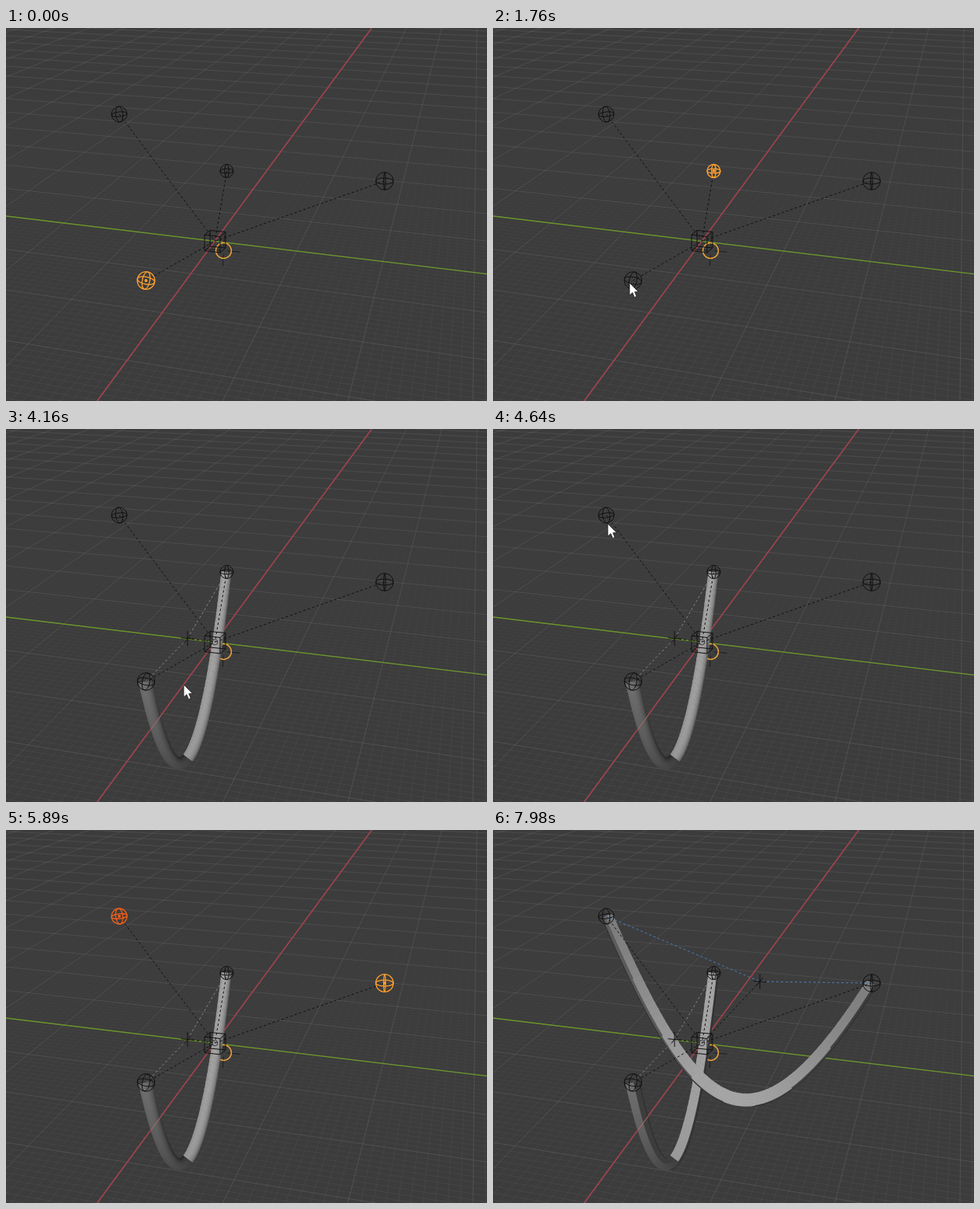
Animation of 620x480 px, one loop 8 s. Source, as an HTML page with a canvas:

```html
<!DOCTYPE html>
<html lang="en">
<head>
<meta charset="utf-8">
<title>Hanging tubes</title>
<style>
html, body { margin: 0; width: 100%; height: 100%; overflow: hidden; background: #3c3c3c; }
canvas { display: block; width: 620px; height: 480px; }
</style>
</head>
<body>
<canvas id="stage" width="620" height="480"></canvas>
<script>
const W = 620, H = 480, LOOP = 8000, STEP = 77.7;
const BLACK = '#101010', ACTIVE = '#ffa02e', PICKED = '#f0601a';
const ctx = document.getElementById('stage').getContext('2d');

const lerp = (a, b, k) => a + (b - a) * k;
const ease = k => k * k * (3 - 2 * k);
const arch = t => Math.sin(Math.PI * t);
const gray = v => `rgb(${[v, v, v].map(Math.round)})`;

function line(c, a, b, color, width = 1, dash = []) {
  c.strokeStyle = color;
  c.lineWidth = width;
  c.setLineDash(dash);
  c.beginPath();
  c.moveTo(...a);
  c.lineTo(...b);
  c.stroke();
  c.setLineDash([]);
}

function ring([x, y], rx, ry, tilt, color, width = 1) {
  ctx.strokeStyle = color;
  ctx.lineWidth = width;
  ctx.beginPath();
  ctx.ellipse(x, y, rx, ry, tilt, 0, 7);
  ctx.stroke();
}

// Ground plane: u runs along the red axis, v along the green one
const ORIGIN = [269.4, 274.2], FAR_U = [609, -188], FAR_V = [-3601, -188];
function ground(u, v) {
  const a = u * 0.0831, b = v * 0.0265, w = 1 + a + b;
  return [0, 1].map(i => (ORIGIN[i] + a * FAR_U[i] + b * FAR_V[i]) / w);
}

function makeFloor() {
  const cv = document.createElement('canvas');
  cv.width = W;
  cv.height = H;
  const c = cv.getContext('2d');
  c.fillStyle = '#3c3c3c';
  c.fillRect(0, 0, W, H);
  const fade = (top, from, to) => {
    const g = c.createLinearGradient(0, top, 0, H);
    g.addColorStop(0, `rgba(255,255,255,${from})`);
    g.addColorStop(1, `rgba(255,255,255,${to})`);
    return g;
  };
  const grid = (n, color) => {
    for (let i = -5 * n; i <= 20 * n; i++) {
      if (n > 1 && i % n === 0) continue;
      line(c, ground(i / n, -6), ground(i / n, 14), color);
      if (i <= 12 * n) line(c, ground(-6, i / n), ground(30, i / n), color);
    }
  };
  grid(10, fade(60, 0, 0.045));
  grid(1, fade(0, 0.08, 0.1));
  line(c, [0, 242], [620, 316.6], '#6a9629', 1.4);
  line(c, [471.5, 0], [117.4, 480], '#a2424d', 1.6);
  return cv;
}
const floor = makeFloor();

// Tubes: points of a cubic, then half width and tones by place t along and s across
const tubeA = {
  pts: [[180, 325], [205, 445], [245, 532], [284, 184]],
  half: t => 9 - 2.8 * t,
  tone: t => t < 0.56 ? 112 - 85 * t : 138 + 28 * t,
  peak: t => t < 0.56 ? -0.4 : 0.35,
  flat: (t, s, tone) => t < 0.56 ? (s < 0.1 ? tone : 62) : (s > -0.6 ? tone : 62),
  edge: t => t < 0.5 ? 1 : -1
};
const tubeB = {
  pts: [[147, 110], [257, 363], [331, 448], [488, 197]],
  half: t => 7.2 + 1.3 * arch(t),
  tone: t => 124 + 42 * arch(t),
  peak: () => 0.25,
  flat: (t, s, tone) => s > 1.3 * Math.abs(t - 0.55) - 1 ? tone : lerp(95, 62, t),
  edge: () => -1
};

// Point at offset s (-1 outer side, 1 inner side) across the tube
function tubePoint(tube, t, s) {
  const [p, q, r, e] = tube.pts, k = 1 - t;
  const at = i => k * k * k * p[i] + 3 * k * k * t * q[i] + 3 * k * t * t * r[i] + t * t * t * e[i];
  const dir = i => k * k * (q[i] - p[i]) + 2 * k * t * (r[i] - q[i]) + t * t * (e[i] - r[i]);
  const dx = dir(0), dy = dir(1);
  const off = s * tube.half(t) / Math.hypot(dx, dy);
  return [at(0) + dy * off, at(1) - dx * off];
}

function drawTube(tube, flat) {
  const n = 70, strips = 12;
  for (let i = 0; i < n; i++) {
    const t = i / n, t2 = Math.min(1, t + 1.25 / n), tone = tube.tone(t);
    const strip = (s, color, width) => line(ctx, tubePoint(tube, t, s), tubePoint(tube, t2, s), color, width);
    for (let j = 0; j < strips; j++) {
      const s = (j + 0.5) / strips * 2 - 1;
      const bend = (s - tube.peak(t)) / 1.4;
      const round = tone * (0.35 + 0.65 * Math.sqrt(Math.max(0, 1 - bend * bend)));
      strip(s, gray(flat ? tube.flat(t, s, tone) : round), tube.half(t) * 2 / strips + 0.5);
    }
    if (flat) strip(tube.edge(t), '#2a2a2a', 0.9);
  }
}

const balls = {
  back: { at: [146, 111], r: 10 },
  mid: { at: [284.5, 184], r: 8.5 },
  right: { at: [488, 197], r: 11.3 },
  front: { at: [180.5, 325], r: 11.3 }
};

// The three circles turn a little with the place in view
function drawBall({ at, r }, color) {
  const [x, y] = at;
  const tilt = (y - 190) / 700, width = color === BLACK ? 1 : 1.3;
  ring(at, r, r, 0, color, width);
  ring(at, r, r * (0.25 + y / 2000), tilt, color, width);
  ring(at, r * (590 - x) / 950, r, tilt, color, width);
  if (color !== BLACK) ring(at, 1, 1, 0, color, 2);
}

function drawCube() {
  const top = [[263, 260.5], [283, 262.5], [276, 268.5], [256, 266]];
  const low = ([x, y]) => [x, y + 20.5];
  top.forEach((p, i) => {
    const q = top[(i + 1) % 4];
    line(ctx, p, q, BLACK);
    line(ctx, low(p), low(q), BLACK);
    line(ctx, p, low(p), BLACK);
  });
}

function drawMarker() {
  const x = 280.5, y = 286.5;
  for (const d of [-1, 1]) {
    line(ctx, [x + d * 5, y + d * 0.4], [x + d * 21, y + d * 1.8], '#1c1c1c');
    line(ctx, [x - d * 0.3, y + d * 5], [x - d, y + d * 20], '#1c1c1c');
  }
  ring([x, y], 10, 10, 0, '#eda23a', 1.5);
}

function drawAxes([x, y]) {
  line(ctx, [x - 8.5, y - 0.8], [x + 8.5, y + 0.8], BLACK);
  line(ctx, [x, y - 9.5], [x, y + 9.5], BLACK);
  line(ctx, [x - 4, y + 5], [x + 4, y - 5], BLACK);
}

const dashed = (a, b, color = BLACK) => line(ctx, a, b, color, 1, [3, 3]);

// Pointer visits: a few stops as [time, x, y], eased in between
const visits = [
  [[210, 553, 443], [600, 193, 280], [990, 307, 170], [1380, 289, 186], [1760, 176, 328],
    [2060, 189, 323], [2540, 189, 323], [2690, 370, 223]],
  [[4160, 230, 330], [4400, 117, 210], [4640, 148, 122], [4870, 143, 115],
    [5340, 491, 192], [5660, 495, 194], [5820, 515, 230]]
];

function drawPointer(t) {
  const stops = visits.find(v => t >= v[0][0] && t < v[v.length - 1][0]);
  if (!stops) return;
  const held = 210 + Math.floor((t - 195) / STEP) * STEP;
  const i = stops.findIndex(s => s[0] > held);
  const a = stops[Math.max(0, i - 1)], b = stops[i];
  const k = ease(Math.max(0, (held - a[0]) / (b[0] - a[0])));
  const x = lerp(a[1], b[1], k), y = lerp(a[2], b[2], k);
  const shape = [[0, 0], [0, 16], [3.8, 12.6], [6.4, 18.6], [9, 17.4], [6.6, 11.6], [11.3, 11.4]];
  ctx.beginPath();
  for (const [px, py] of shape) ctx.lineTo(x + px, y + py);
  ctx.closePath();
  ctx.fillStyle = '#fff';
  ctx.strokeStyle = '#222';
  ctx.lineWidth = 0.8;
  ctx.fill();
  ctx.stroke();
}

// Selection from a time on: active ball, then the one also picked
const selection = [
  [0, 'front'], [1380, 'mid'], [2230, 'front', 'mid'], [4080],
  [4870, 'back'], [5660, 'right', 'back'], [7050]
];

function draw(t) {
  const first = t >= 4080, second = t >= 7050, flat = t >= 7910;
  const hookA = [234, 269.5], hookB = [344, 195];
  const { back, mid, right, front } = balls;
  const hook = (at, a, b, color) => {
    dashed(a.at, at, color);
    dashed(b.at, at, color);
    dashed(at, ORIGIN);
    drawAxes(at);
  };
  ctx.drawImage(floor, 0, 0);
  drawMarker();
  if (first) {
    drawTube(tubeA, flat);
    line(ctx, [187, 386], [200, 368.5], '#a8666c', 1.2);
  }
  if (second) drawTube(tubeB, flat);
  drawCube();
  for (const b of Object.values(balls)) dashed(b.at, ORIGIN);
  if (first) {
    ring(ORIGIN, 3.5, 3.5, 0, '#333');
    hook(hookA, front, mid, '#858585');
  }
  if (second) hook(hookB, back, right, '#4b7fbd');
  const [, active, picked] = selection.filter(s => s[0] <= t).pop();
  for (const name in balls) {
    drawBall(balls[name], name === active ? ACTIVE : name === picked ? PICKED : BLACK);
  }
  drawPointer(t);
}

const start = performance.now();
function tick() {
  draw((performance.now() - start) % LOOP);
  requestAnimationFrame(tick);
}
tick();
</script>
</body>
</html>
```
